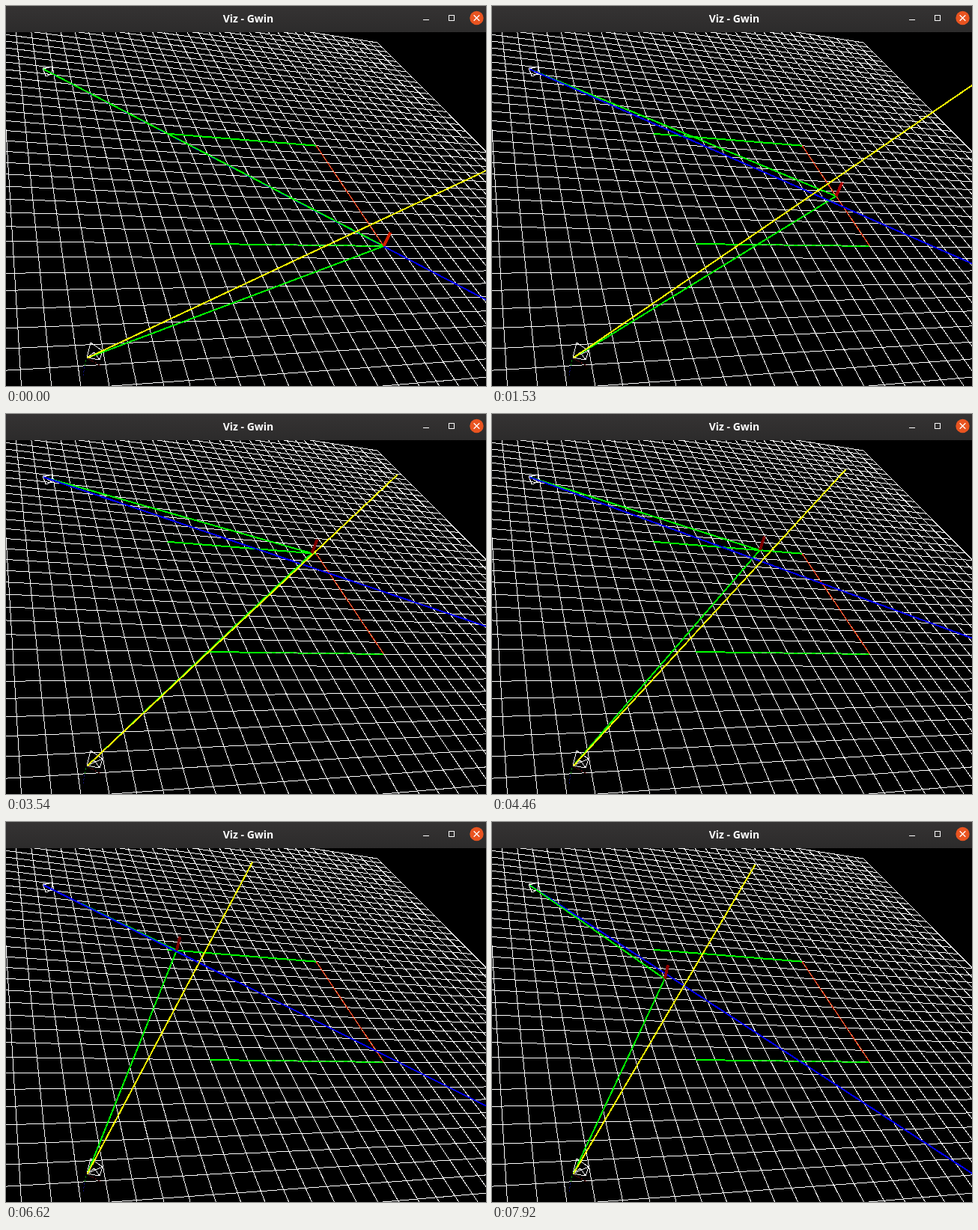
These frames come from a looping animation (641 px wide and 508 px high, 8 s). An HTML page:

```html
<!DOCTYPE html>
<html lang="en">
<head>
<meta charset="utf-8">
<title>Viz</title>
<style>
  html, body { margin: 0; width: 100%; height: 100%; overflow: hidden; background: #000; }
  svg { display: block; width: 641px; height: 508px; }
  path, line { fill: none; }
  .scene { shape-rendering: crispEdges; }
  .title { font: bold 14px "Open Sans", "Noto Sans", sans-serif; fill: #fff; text-anchor: middle; }
</style>
</head>
<body>
<svg viewBox="0 0 641 508">
  <defs>
    <linearGradient id="bar" x2="0" y2="1">
      <stop offset="0" stop-color="#353333"/>
      <stop offset="1" stop-color="#2c2b2b"/>
    </linearGradient>
  </defs>
  <rect width="641" height="508"/>
  <g class="scene">
    <path id="grid" stroke="#fff"/>
    <g id="track"></g>
    <g stroke-dasharray="3 2">
      <path d="M107 473L105 481" stroke="#0a7a0a"/>
      <path d="M105 482L103 494" stroke="#101070"/>
      <path d="M110 472L127 481" stroke="#601010"/>
    </g>
    <g stroke="#fff">
      <path d="M113 450L129 461L125 473L108 470ZM108 470L129 461M108 470L118 463L125 473"/>
      <path d="M49 83L62 81L61 91L53 94ZM50 84L62 81M50 84L61 91"/>
    </g>
    <g stroke-width="2">
      <line id="blue" stroke="#00f"/>
      <line id="green2" stroke="#0f0"/>
      <line id="green1" stroke="#0f0"/>
      <line id="blueTop" stroke="#00f"/>
      <line id="yellow" stroke="#ff0"/>
    </g>
    <line id="marker" stroke-width="4"/>
  </g>

  <rect width="641" height="35" fill="url(#bar)"/>
  <text class="title" x="323.5" y="22">Viz - Gwin</text>
  <g stroke="#fff" shape-rendering="crispEdges">
    <path d="M557 18.5H565"/>
    <path d="M591.5 12.5H598.5V19.5H591.5Z"/>
  </g>
  <circle cx="628.5" cy="16" r="9.2" fill="#e95420"/>
  <path d="M624.7 12.2L632.3 19.8M632.3 12.2L624.7 19.8" stroke="#fff" stroke-width="1.3"/>
</svg>
<script>
const $ = id => document.getElementById(id);
const LOOP = 8000, TICK = 76.9, LAST = 103, DEG = Math.PI / 180;
const cam1 = [108.6, 470.4], cam2 = [50, 84.3];

// Ground plane to screen, in grid cells
function project(a, b) {
  const w = 0.8906 + 0.01094 * a + 0.01993 * b;
  return [(242.69 + 26.18 * a - 0.777 * b) / w,
          (283.21 + 3.779 * a - 9.711 * b) / w];
}

const seg = (p, q) => "M" + p.map(v => v.toFixed(2)) + "L" + q.map(v => v.toFixed(2));

function drawGrid() {
  const lo = -12, maxA = 25, maxB = 30;
  let d = "";
  for (let a = lo; a <= maxA; a++) d += seg(project(a, lo), project(a, maxB));
  for (let b = lo; b <= maxB; b++) d += seg(project(lo, b), project(maxA, b));
  $("grid").setAttribute("d", d);
}

function addTrack(p, q, color, width, dash = "none") {
  const path = document.createElementNS("http://www.w3.org/2000/svg", "path");
  const attrs = { d: seg(project(...p), project(...q)), stroke: color,
                  "stroke-width": width, "stroke-dasharray": dash };
  for (const k in attrs) path.setAttribute(k, attrs[k]);
  $("track").append(path);
}

function setLine(id, [x1, y1], [x2, y2]) {
  const attrs = { x1, y1, x2, y2 };
  for (const k in attrs) $(id).setAttribute(k, attrs[k].toFixed(2));
}

// Piecewise linear through [x, y] knots
function lerp(knots, x) {
  let i = 1;
  while (i < knots.length - 1 && x > knots[i][0]) i++;
  const [x0, y0] = knots[i - 1], [x1, y1] = knots[i];
  return y0 + (y1 - y0) * (x - x0) / (x1 - x0);
}

const progress = [[0, 0], [50, 0], [3340, 1], [3430, 1], [6805, 2], [6890, 2], [10262, 3]];
const corners = [[10, 0], [10, 10], [0, 10], [0, 0]];
// Bearing of the moving point against that of the yellow ray, in degrees
const bearing = [[21.7, 27.82], [40.75, 42.52], [51.47, 50.41], [58.47, 55.7], [69.33, 64.83]];

function targetAt(t) {
  const p = lerp(progress, t), i = Math.min(Math.floor(p), 2), u = p - i;
  const [p0, p1] = [corners[i], corners[i + 1]];
  return project(p0[0] + (p1[0] - p0[0]) * u, p0[1] + (p1[1] - p0[1]) * u);
}

function render(time) {
  const n = Math.min(LAST, Math.floor((time % LOOP + 9) / TICK));
  const target = targetAt(n * TICK), [x, y] = target;

  const dip = Math.atan2(y - cam2[1], x - cam2[0]) / DEG;
  const blueDip = 27.54 + 0.765 * (dip - 27.49);
  const far = [800, cam2[1] + Math.tan(blueDip * DEG) * (800 - cam2[0])];
  setLine("blue", cam2, far);
  setLine("blueTop", cam2, far);
  $("blueTop").style.display = dip < 27 ? "" : "none";
  setLine("green1", cam1, target);
  setLine("green2", cam2, target);

  const angle = Math.atan2(x - cam1[0], cam1[1] - y) / DEG;
  const m = Math.tan(lerp(bearing, angle) * DEG);
  const h = 448.5 / (1 + 0.143 * m);
  setLine("yellow", cam1, [cam1[0] + m * h, cam1[1] - h]);

  setLine("marker", target, [x + 4.5 + (x - 230) * 0.016, y - 18.5]);
  const red = Math.round(120 + (y - 175) * 0.62);
  $("marker").setAttribute("stroke", `rgb(${red},${Math.max(0, red - 180)},0)`);
}

drawGrid();
addTrack([0, 0], [10, 0], "#0f0", 2);
addTrack([3, 0], [10, 0], "#b0ffb0", 0.7, "7 5");
addTrack([0, 10], [10, 10], "#0f0", 2);
addTrack([10, 0], [10, 10], "#f03a1a", 1.5);
addTrack([10, 0], [10, 10], "#ffa070", 1, "3 4");

const start = performance.now();
function loop() {
  render(performance.now() - start);
  requestAnimationFrame(loop);
}
loop();
</script>
</body>
</html>
```
